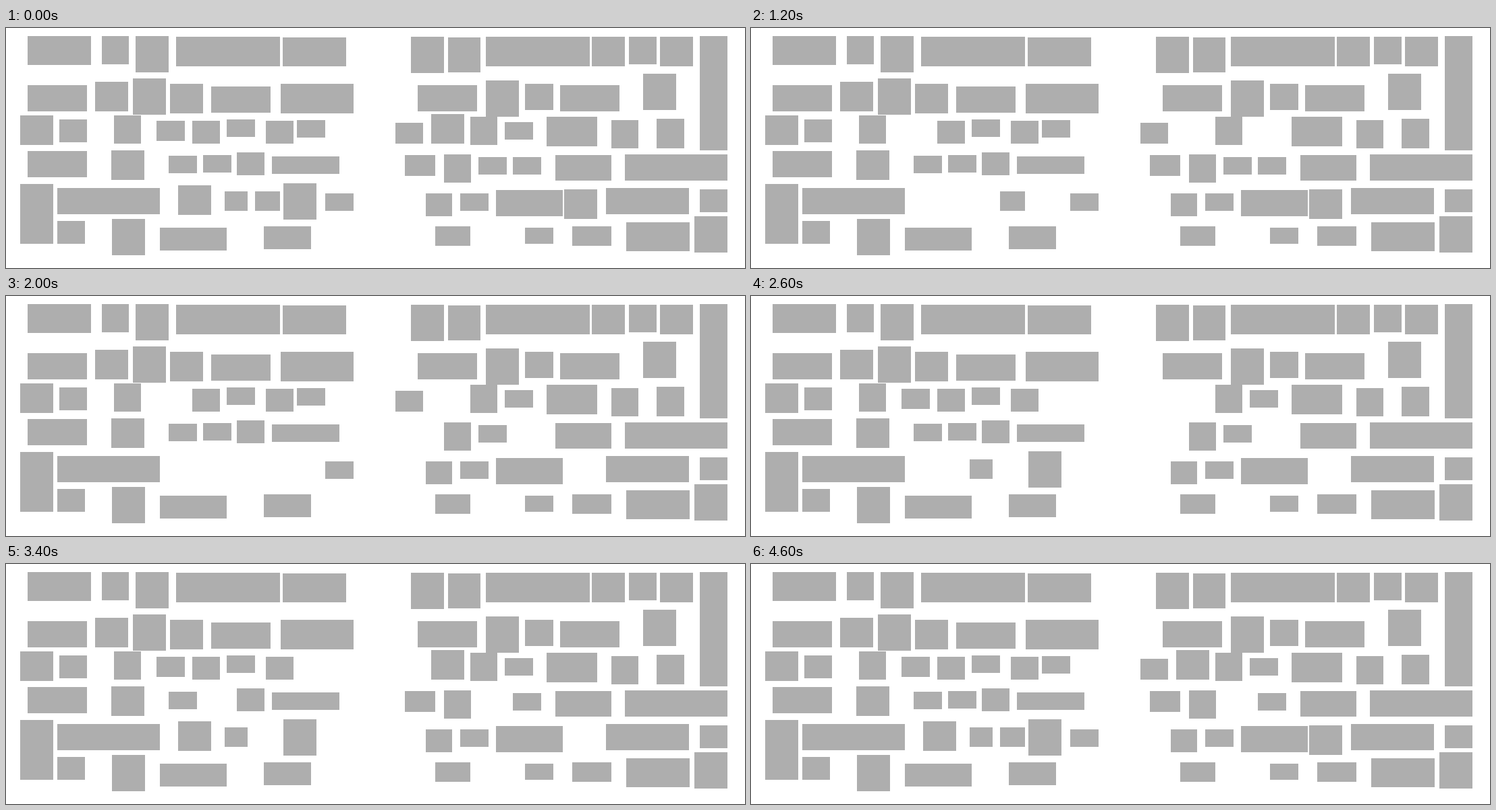
An HTML page for the animation above (4.8 s loop, 1095 by 357 pixels).

```html
<!DOCTYPE html>
<html lang="en">
<head>
<meta charset="utf-8">
<title>Blinking blocks</title>
<style>
  html, body { margin: 0; width: 100%; height: 100%; overflow: hidden; background: #fff; }
  i { position: absolute; background: #aeaeae; }
  .square { width: 49px; height: 44px; }
  .tall { width: 49px; height: 54px; }
  .banner { width: 94px; height: 43px; }
  .wide { width: 154px; height: 44px; }
  .medium { width: 88px; height: 39px; }
  .narrow { width: 40px; height: 42px; }
  .small { width: 41px; height: 34px; }
  .chip { width: 42px; height: 26px; }
  .bar { width: 152px; height: 39px; }
</style>
</head>
<body>
<script>
const LOOP = 4800, STEP = 200, HIDDEN = 1800;

function addBlock(kind, left, top, width, height) {
  const block = document.createElement('i');
  block.className = kind;
  block.style.left = left + 'px';
  block.style.top = top + 'px';
  if (width) {
    block.style.width = width + 'px';
    block.style.height = height + 'px';
  }
  return document.body.appendChild(block);
}

// Each row is its top edge followed by the left edges in it.
function addRows(kind, ...rows) {
  for (const [top, ...lefts] of rows) {
    lefts.forEach(left => addBlock(kind, left, top));
  }
}

addRows('square', [13, 868, 969], [80, 132], [83, 243], [130, 21], [182, 156]);
addRows('tall', [12, 192], [13, 600], [75, 188], [78, 711], [68, 944], [284, 157], [280, 1020]);
addRows('banner', [12, 32], [14, 410], [289, 919]);
addRows('wide', [13, 252, 711]);
addRows('medium', [85, 32, 610, 821], [87, 304], [183, 32]);
addRows('narrow', [12, 142], [130, 160], [132, 688], [137, 897], [188, 649]);
addRows('small', [136, 79], [138, 276, 385], [185, 342], [240, 1028], [287, 76]);
addRows('chip', [136, 327], [190, 241], [246, 673]);
addRows('bar', [238, 76], [188, 917]);

// Blocks of a size of their own: left, top, width, height.
const singles = [
  [655, 14, 48, 52], [923, 13, 41, 41], [1028, 12, 41, 170],
  [407, 83, 108, 44], [769, 83, 42, 39],
  [801, 132, 75, 44], [964, 135, 41, 44],
  [394, 191, 100, 26], [814, 189, 83, 38],
  [21, 232, 49, 89], [622, 246, 39, 34], [726, 241, 99, 39], [889, 238, 123, 39],
  [228, 297, 99, 34], [382, 295, 70, 34], [636, 295, 52, 29],
  [769, 297, 42, 24], [839, 295, 58, 29],
];
singles.forEach(box => addBlock('single', ...box));

// In the order in which they vanish, one per step.
const blinking = [
  ['chip', 739, 140], ['single', 223, 138, 42, 30], ['single', 324, 243, 34, 29],
  ['tall', 411, 231], ['square', 630, 128], ['square', 255, 234],
  ['single', 591, 189, 45, 31], ['chip', 751, 192], ['square', 827, 240],
  ['single', 369, 243, 37, 29], ['chip', 431, 137], ['chip', 473, 246],
  ['single', 577, 141, 41, 31], ['chip', 292, 189], ['chip', 700, 192],
];
const blinks = blinking.map((spec, index) => ({
  block: addBlock(...spec),
  start: (index + 1) * STEP,
}));

function draw(now) {
  const time = now % LOOP;
  for (const { block, start } of blinks) {
    const hidden = time >= start && time < start + HIDDEN;
    block.style.visibility = hidden ? 'hidden' : 'visible';
  }
}

const begin = performance.now();
function tick() {
  draw(performance.now() - begin);
  requestAnimationFrame(tick);
}
tick();
</script>
</body>
</html>
```
